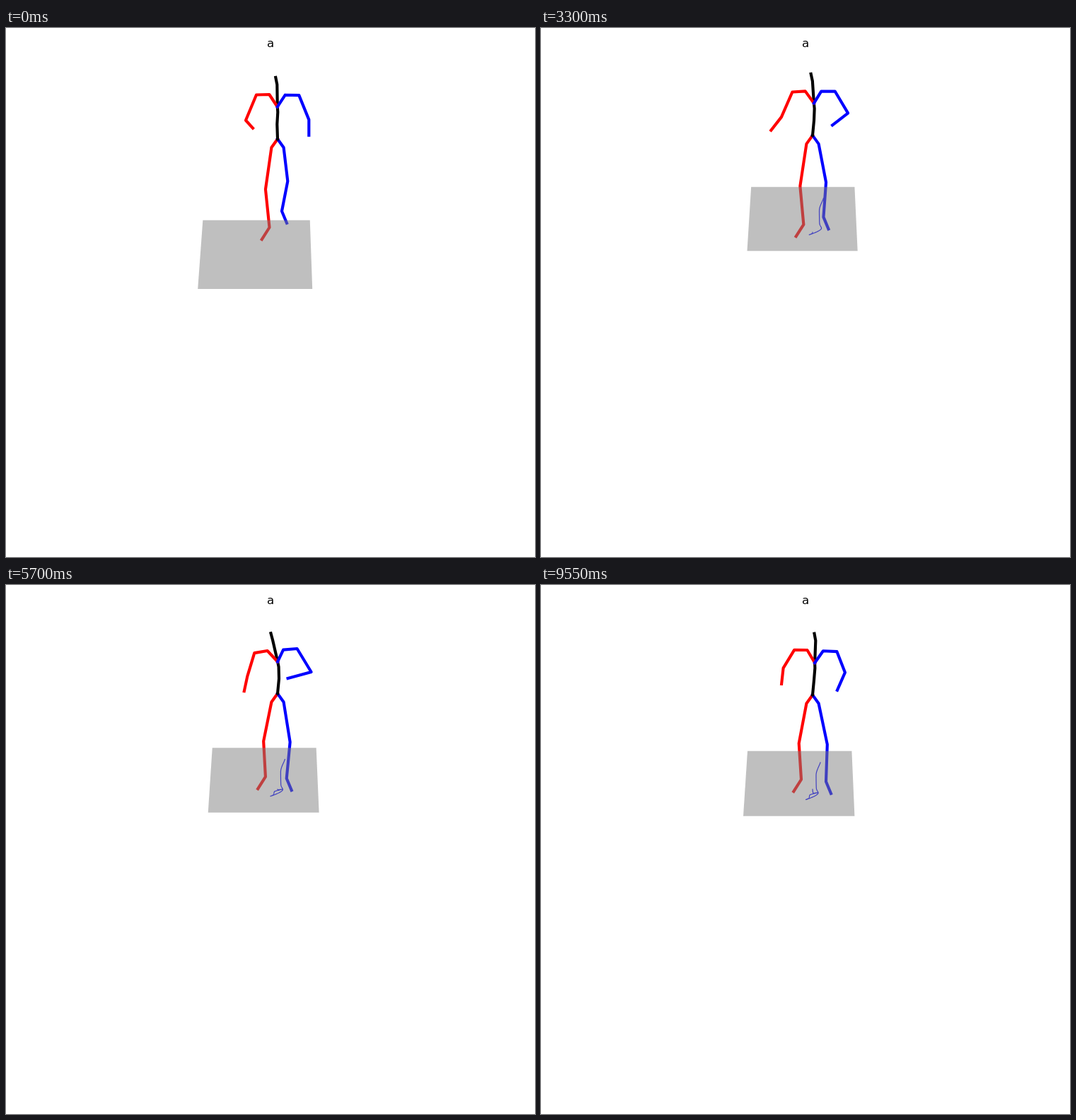
Recreate the animation shown at these times as an HTML page with a canvas. Size 748 by 748 pixels, loop 9.6 s.

```html
<!DOCTYPE html>
<html>
<head>
<meta charset="utf-8">
<style>
  html, body { margin: 0; width: 100%; height: 100%; overflow: hidden; background: #fff; }
  canvas { display: block; }
</style>
</head>
<body>
<canvas id="stage" width="748" height="748"></canvas>
<script>
const ctx = document.getElementById('stage').getContext('2d');
const LOOP = 9600, STEP = 50;

// Key moments: each row is a time in ms, then the values at that time.
const rootKeys = [            // ground position of the body
  [0, 395, 251], [500, 389, 269], [950, 389.3, 287], [1400, 392, 294],
  [2350, 374.5, 303.5], [3050, 379, 301], [4000, 380, 297],
  [4600, 392, 293.5], [5050, 385, 294.5], [7050, 384.2, 291], [9550, 384, 289]
];
const torsoKeys = [           // sideways lean, vertical bob
  [0, 0, 3], [950, 0, 0.7], [2350, -2, 0.8], [3050, 0, -2.5],
  [4200, -19, 0.4], [5700, -9.5, -0.5], [7050, -2.5, -1.3], [9550, 2.5, 1.5]
];
const leftArmKeys = [         // upper arm vector, forearm vector
  [0, 14, 34.5, 0, 22], [950, 21, 30, -2.5, 5.5], [1500, 18, -26, -8, -32],
  [2350, 15, 30, -15.5, 23], [4200, 21.5, 31.5, -27, 10.5],
  [5700, 20, 33, -33, 9], [7050, 20, 27, -26, 27.5], [9550, 11.5, 29.5, -11, 25]
];
const rightArmKeys = [
  [0, -15, 36, 10, 11], [950, -13, 35.5, 4.5, 8.5], [2350, -23.5, 32, -21.5, 17.5],
  [4200, -8, 38.5, -7, 19.5], [5700, -10, 33, -4.5, 21], [7050, -16.5, 38.5, -10.5, 9.5],
  [8050, -29.5, 22, -26, 6], [9050, -15.5, 25.5, -2.5, 22.5]
];
const leftFootKeys = [[0, 785, 510], [950, 779.5, 568], [2350, 778.5, 567.5], [9550, 787, 567]];
const rightFootKeys = [[0, 767.5, 533], [950, 772.5, 551.5], [2350, 750.5, 581], [5700, 751.5, 565], [9550, 752, 564]];

// Monotone cubic interpolation, so held values never overshoot.
function sample(rows, t) {
  const last = rows.length - 1;
  t = Math.min(t, rows[last][0]);
  let i = 0;
  while (i < last - 1 && rows[i + 1][0] <= t) i++;
  const a = rows[i], b = rows[i + 1], span = b[0] - a[0], u = (t - a[0]) / span;
  const tangent = (p, q) => p * q > 0 ? 2 * p * q / (p + q) : 0;
  return a.slice(1).map((from, n) => {
    const k = n + 1, rise = b[k] - from;
    const slope = j => rows[j] && rows[j + 1]
      ? (rows[j + 1][k] - rows[j][k]) / (rows[j + 1][0] - rows[j][0]) : rise / span;
    const m0 = tangent(slope(i - 1), slope(i)) * span;
    const m1 = tangent(slope(i), slope(i + 1)) * span;
    return from + u * (m0 + u * (3 * rise - 2 * m0 - m1 + u * (m0 + m1 - 2 * rise)));
  });
}
function smooth(from, to, t) {
  const u = Math.min(1, Math.max(0, (t - from) / (to - from)));
  return u * u * (3 - 2 * u);
}
const add = ([x, y], dx, dy) => [x + dx, y + dy];

// Perspective ground plane, seen by a camera that follows the body.
const VANISH_X = 381, HORIZON = -1129;
const toGround = ([x, y]) => [(x - VANISH_X) / (y - HORIZON), 1 / (y - HORIZON)];
const home = toGround([384, 289]);
const floorCorners = [[292, 234.7], [439.4, 234.7], [443.4, 326.7], [286, 326.7]].map(toGround);
const trail = [];
for (let t = 0; t < LOOP; t += STEP) trail.push(toGround(sample(rootKeys, t)));

// Upper joints bend further the higher they sit; bending also lowers them.
function spine(lean, bob, sway) {
  const joint = (x, y, bend) => [x + sway + bend * lean, y + bob + bend * lean * lean * 0.02];
  return [
    [384, 154 + bob], joint(386, 133, 0), joint(387, 116, 0.15),
    joint(386.5, 108.5, 0.25), joint(386, 77, 0.93), joint(384, 67, 1)
  ];
}

function arm(collar, shoulder, [ux, uy, fx, fy]) {
  const elbow = add(shoulder, ux, uy);
  return [collar, shoulder, elbow, add(elbow, fx, fy)];
}

// Feet stay planted on the ground; the knee bends outward from the middle of the leg.
function leg(pelvis, side, [fx, fy], [rx, ry]) {
  const hip = add(pelvis, 8.6 * side, 12), ankle = [fx - rx, fy - ry];
  const knee = [(hip[0] + ankle[0]) / 2 + 7 * side, (hip[1] + ankle[1]) / 2 + 2.6];
  return [pelvis, hip, knee, ankle, add(ankle, side > 0 ? 7 : -10.7, 16.8)];
}

function trace(points) {
  ctx.beginPath();
  points.forEach(p => ctx.lineTo(...p));
}
function stroke(points, color, width = 4.15) {
  trace(points);
  ctx.strokeStyle = color;
  ctx.lineWidth = width;
  ctx.stroke();
}

function draw(t) {
  const index = Math.floor(t / STEP), origin = trail[index], root = sample(rootKeys, t);
  const project = ([x, z]) => {
    const scale = 1 / (z - origin[1] + home[1]);
    return [VANISH_X + (x - origin[0] + home[0]) * scale, HORIZON + scale];
  };

  const [lean, bob] = sample(torsoKeys, t);
  const back = spine(lean, bob, 2.7 * (smooth(950, 2350, t) - 1));
  const pelvis = back[0], chest = back[3];
  const leftCollar = add(chest, 11 + 0.32 * lean, -16.8);
  const leftShoulder = add(leftCollar, 19.5, 0.4 + 0.22 * lean);
  const rightCollar = add(chest, -11.5 + 0.32 * lean, -17.5 - 0.22 * lean);
  const rightShoulder = add(rightCollar, -18.3, 0.5 - 0.27 * lean);

  ctx.fillStyle = '#fff';
  ctx.fillRect(0, 0, 748, 748);
  ctx.lineJoin = 'round';
  ctx.lineCap = 'square';

  if (index) stroke(trail.slice(0, index + 1).map(project), '#00f', 1.2);
  stroke(leg(pelvis, -1, sample(rightFootKeys, t), root), '#f00');
  stroke(leg(pelvis, 1, sample(leftFootKeys, t), root), '#00f');
  stroke(back, '#000');
  stroke([chest, ...arm(rightCollar, rightShoulder, sample(rightArmKeys, t))], '#f00');
  stroke([chest, ...arm(leftCollar, leftShoulder, sample(leftArmKeys, t))], '#00f');

  trace(floorCorners.map(project));
  ctx.fillStyle = 'rgba(128, 128, 128, 0.5)';
  ctx.fill();

  ctx.fillStyle = '#000';
  ctx.font = '16.67px "DejaVu Sans", sans-serif';
  ctx.textAlign = 'center';
  ctx.fillText('a', 374, 27);
}

const start = performance.now();
function tick() {
  const t = (performance.now() - start) % LOOP;
  draw(Math.floor(t / STEP) * STEP);
  requestAnimationFrame(tick);
}
tick();
</script>
</body>
</html>
```
